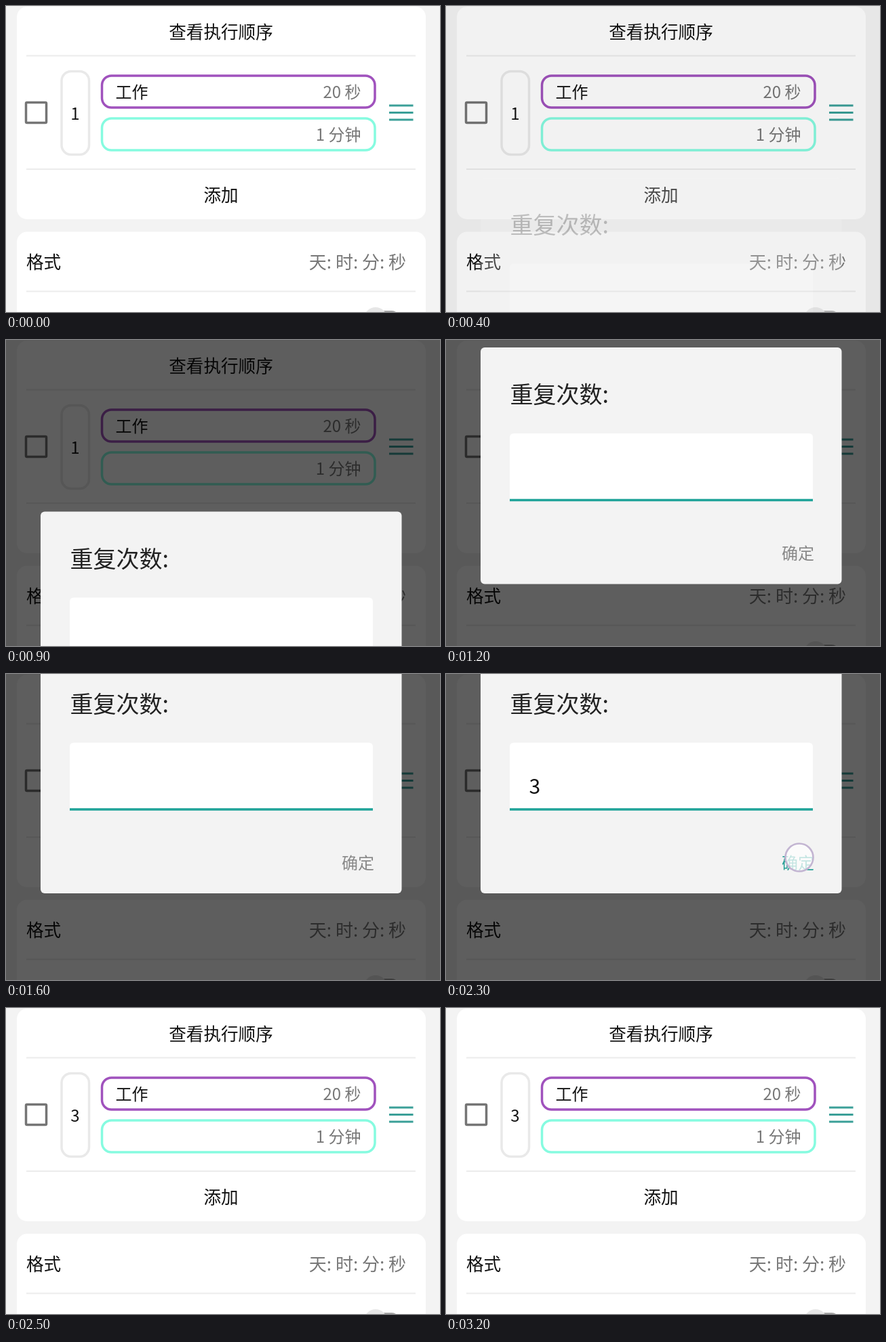
Recreate the animation shown at these times as an HTML page. Size 640 by 452 pixels, loop 3700 ms.

```html
<!DOCTYPE html>
<html lang="zh-CN">
<head>
<meta charset="utf-8">
<style>
  html, body { margin: 0; width: 100%; height: 100%; overflow: hidden; background: #f3f3f3; }
  svg { display: block; width: 100vw; height: 100vh; }
  text { font-family: "Noto Sans CJK SC", "Noto Sans CJK", "Noto Sans", sans-serif; fill: #111; }
  .heading { font-size: 25.6px; }
  .item { font-size: 24px; }
  .muted { fill: #777; }
  .mid { text-anchor: middle; }
  .end { text-anchor: end; }
  .card { fill: #fff; }
  .rule { stroke: #ececec; stroke-width: 2; }
  .box { fill: none; stroke-width: 3.5; }
</style>
</head>
<body>
<svg viewBox="0 0 640 452" preserveAspectRatio="none">
  <rect width="640" height="452" fill="#f3f3f3"/>
  <rect class="card" x="16" y="1" width="603" height="314" rx="15"/>
  <rect class="card" x="16" y="333.5" width="603" height="150" rx="15"/>
  <path class="rule" d="M30 73.5H604M30 241H604M30 421.5H604"/>

  <text class="heading mid" x="317" y="47.5">查看执行顺序</text>
  <text class="heading mid" x="317" y="288.5">添加</text>
  <text class="heading" x="30" y="388">格式</text>
  <text class="muted end" x="590" y="388" font-size="26">天: 时: 分: 秒</text>

  <rect class="box" x="29.5" y="142.5" width="30" height="30" rx="1.5" stroke="#757575"/>
  <rect class="box" x="82" y="96.5" width="40.5" height="123" rx="14" stroke="#e9e9e9"/>
  <text id="count" class="item mid" x="102" y="167.5">1</text>
  <rect class="box" x="141.5" y="103" width="402.5" height="47" rx="14" stroke="#a052bd"/>
  <rect class="box" x="141.5" y="166" width="402.5" height="47" rx="14" stroke="#86fbe0"/>
  <text class="item" x="161.5" y="136">工作</text>
  <text class="item muted end" x="523.5" y="136">20 秒</text>
  <text class="item muted end" x="523.5" y="199">1 分钟</text>
  <path d="M565 147H600.5M565 157.5H600.5M565 168H600.5" stroke="#3a9f98" stroke-width="2.8"/>

  <rect x="538" y="450" width="41" height="20" rx="10" fill="#a6a6a6"/>
  <circle cx="545" cy="462" r="17" fill="#e6e6e6"/>

  <rect id="dim" width="640" height="452" opacity="0"/>

  <g id="dialog" opacity="0">
    <rect x="51" width="532.5" height="349.5" rx="6" fill="#f3f3f3"/>
    <text x="94.5" y="82" font-size="34" style="fill:#222">重复次数:</text>
    <path d="M94 227V133q0-6 6-6H535q6 0 6 6V227Z" fill="#fff"/>
    <path d="M94 225.5H541" stroke="#1fa399" stroke-width="3.5"/>
    <text id="entry" x="122.5" y="202.5" font-size="30"></text>
    <text id="confirm" class="item" x="495" y="313">确定</text>
  </g>

  <circle id="touch" r="20.5" fill="#fff" fill-opacity=".72" stroke="#c3b5d2" stroke-width="2.6" opacity="0"/>
</svg>
<script>
const LOOP = 3700, STEP = 100;
const [count, dim, dialog, entry, confirmButton, touch] =
  ["count", "dim", "dialog", "entry", "confirm", "touch"].map(id => document.getElementById(id));

// Each track lists [start time, value]; a value holds until the next entry.
const tracks = {
  dim: [[0, 0], [400, .05], [500, .22], [600, .63], [2400, .25], [2500, 0]],
  alpha: [[0, 0], [400, .25], [500, .8], [600, 1], [2400, .3], [2500, 0]],
  top: [[0, 253.5], [1200, 11], [1300, -25.5], [2500, 253.5]],
  touch: [[0, 0], [100, .6], [200, 1], [300, .6], [400, 0], [2200, .6], [2300, 1], [2400, 0]]
};

function at(track, t) {
  return track.filter(([start]) => start <= t).pop()[1];
}

function render(t) {
  const typed = t >= 1800;
  dim.setAttribute("opacity", at(tracks.dim, t));
  dialog.setAttribute("opacity", at(tracks.alpha, t));
  dialog.setAttribute("transform", `translate(0 ${at(tracks.top, t)})`);
  entry.textContent = typed ? "3" : "";
  confirmButton.style.fill = typed ? "#2aa198" : "#888";
  count.textContent = t >= 2400 ? "3" : "1";
  touch.setAttribute("opacity", at(tracks.touch, t));
  touch.setAttribute("transform", t < 1200 ? "translate(102 158)" : "translate(521 271)");
}

const began = performance.now();
function tick() {
  const t = (performance.now() - began) % LOOP;
  render(Math.floor(t / STEP) * STEP);
  requestAnimationFrame(tick);
}
render(0);
requestAnimationFrame(tick);
</script>
</body>
</html>
```
